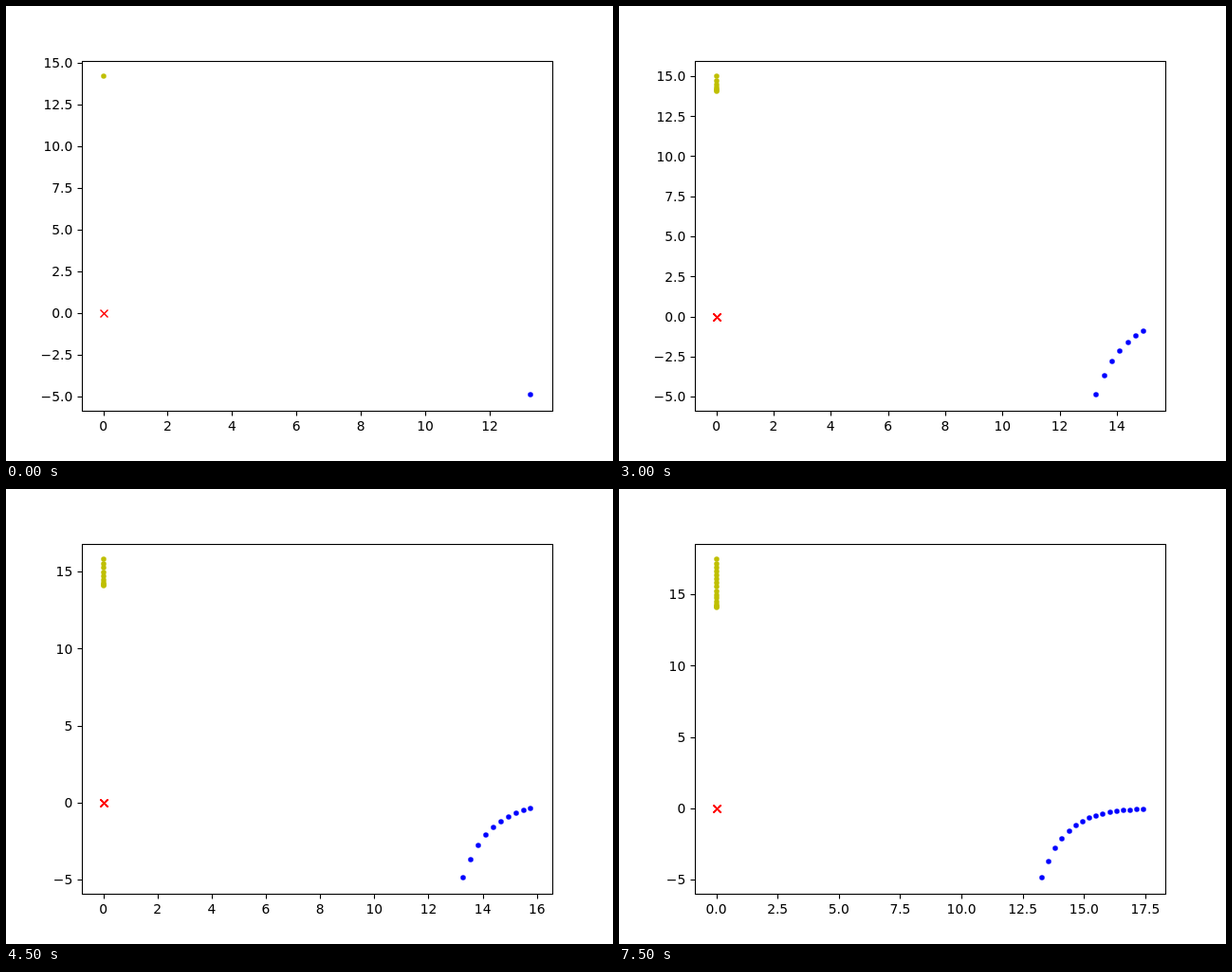
These frames come from a looping animation (640 px wide and 480 px high, 8000 ms). An HTML page with a canvas:

```html
<!DOCTYPE html>
<html>
<head>
<meta charset="utf-8">
<style>
  html, body { margin: 0; width: 640px; height: 480px; overflow: hidden; background: #fff; }
  canvas { display: block; }
</style>
</head>
<body>
<canvas id="stage" width="640" height="480"></canvas>
<script>
const ctx = document.getElementById('stage').getContext('2d');
const LEFT = 80, RIGHT = 576, TOP = 57.6, BOTTOM = 427.2;
const STEPS = 16, STEP_MS = 500, DT = 0.2776;

// x grows steadily, y decays exponentially, r is the distance to the origin
const points = Array.from({ length: STEPS }, (_, i) => {
  const x = 13.28 + DT * i, y = -4.9 * Math.exp(-DT * i);
  return { x, y, r: Math.hypot(x, y) };
});

// Linear axis with a 5% margin at both ends and at most nine tick intervals
function makeAxis(min, max, from, to) {
  const pad = (max - min) * 0.05;
  const lo = min - pad, hi = max + pad;
  const map = v => from + (v - lo) / (hi - lo) * (to - from);
  const step = [1, 2, 2.5, 5, 10].find(s => s >= (hi - lo) / 9);
  const ticks = [];
  for (let k = Math.ceil(lo / step); k * step <= hi; k++) {
    const v = k * step;
    const label = Math.abs(v).toFixed(step === 2.5 ? 1 : 0);
    ticks.push({ at: map(v), label: (v < 0 ? '\u2212' : '') + label });
  }
  return { map, ticks };
}

function line(x1, y1, x2, y2) {
  ctx.beginPath();
  ctx.moveTo(x1, y1);
  ctx.lineTo(x2, y2);
  ctx.stroke();
}

function dot(x, y, color) {
  ctx.fillStyle = color;
  ctx.beginPath();
  ctx.arc(Math.round(x), Math.round(y), 2.78, 0, 2 * Math.PI);
  ctx.fill();
}

function cross(x, y) {
  const cx = Math.round(x) + 0.5, cy = Math.round(y) + 0.5;
  line(cx - 4, cy - 4, cx + 4, cy + 4);
  line(cx - 4, cy + 4, cx + 4, cy - 4);
}

function drawAxes(xAxis, yAxis) {
  ctx.strokeStyle = ctx.fillStyle = '#000';
  ctx.lineWidth = 1.11;
  ctx.strokeRect(80.5, 58.5, 496, 369);
  ctx.font = '13.89px "DejaVu Sans", sans-serif';
  ctx.textAlign = 'center';
  for (const { at, label } of xAxis.ticks) {
    const x = Math.round(at) + 0.5;
    line(x, 427.5, x, 432.5);
    ctx.fillText(label, at, 448);
  }
  ctx.textAlign = 'right';
  for (const { at, label } of yAxis.ticks) {
    const y = Math.round(at) + 0.5;
    line(75.5, y, 80.5, y);
    ctx.fillText(label, 70.28, Math.round(at + 5.3));
  }
}

function draw(now) {
  const shown = points.slice(0, Math.floor(now / STEP_MS) % STEPS + 1);
  const xAxis = makeAxis(0, shown[shown.length - 1].x, LEFT, RIGHT);
  const yAxis = makeAxis(points[0].y, Math.max(...shown.map(p => p.r)), BOTTOM, TOP);
  const originX = xAxis.map(0);

  ctx.fillStyle = '#fff';
  ctx.fillRect(0, 0, 640, 480);
  ctx.strokeStyle = '#f00';
  ctx.lineWidth = 1.39;
  for (const p of shown) {
    cross(originX, yAxis.map(0));
    dot(xAxis.map(p.x), yAxis.map(p.y), '#00f');
    dot(originX, yAxis.map(p.r), '#bfbf00');
  }
  drawAxes(xAxis, yAxis);
  requestAnimationFrame(() => draw(performance.now()));
}

draw(0);
</script>
</body>
</html>
```
